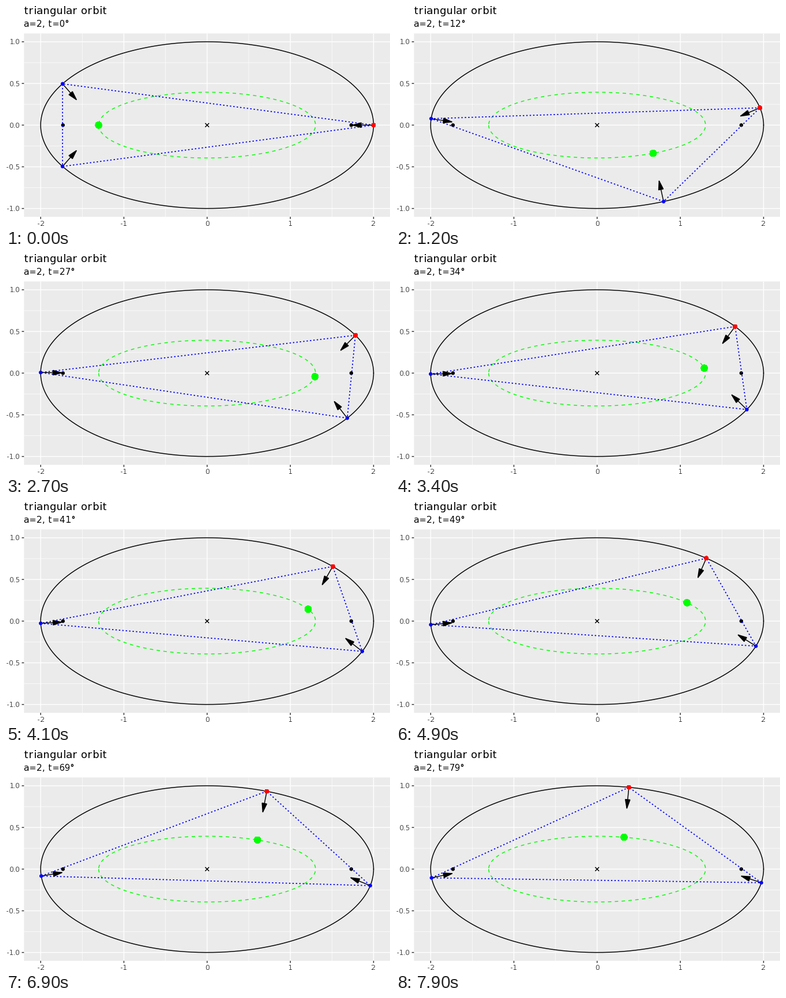
Write a matplotlib script that moves like this. It is 666x381 px and loops after 8 s.

```python
import numpy as np
import matplotlib.pyplot as plt
from matplotlib.animation import FuncAnimation
from matplotlib.patches import Circle, Polygon, Rectangle

W, H, DPI = 666, 381, 100
A, B = 2.0, 1.0
CX, CY, S = 348.8, 206.3, 144.35      # data origin and scale in pixels
PT = 72 / DPI                         # points per pixel
LW = 1.482 * PT

plt.rcParams["font.family"] = "DejaVu Sans"
plt.rcParams["text.hinting_factor"] = 1   # whole-pixel glyph advances
fig = plt.figure(figsize=(W / DPI, H / DPI), dpi=DPI, facecolor="white")
ax = fig.add_axes([0, 0, 1, 1])
ax.set_xlim(0, W)
ax.set_ylim(H, 0)
ax.axis("off")


def px(p):
    """Data coordinates to stage pixels."""
    return np.asarray(p) * [S, -S] + [CX, CY]


def line(pts, color, lw=LW, **kw):
    return ax.plot(*px(pts).T, color=color, lw=lw, snap=False, **kw)[0]


def dot(p, r, color, z=6, **kw):
    return ax.add_patch(Circle(px(p), r, color=color, lw=0, zorder=z, **kw))


def dashes(on, off, lw):
    """Butt-capped dash pattern given in pixels."""
    w = lw / PT
    return dict(ls=(0, (on / w, off / w)), lw=lw, dash_capstyle="butt")


def ellipse(a, b):
    u = np.linspace(0, 2 * np.pi, 721)
    return np.column_stack([a * np.cos(u), b * np.sin(u)])


def label(x, y, s, size, color="black", ha="left"):
    return ax.text(x, y, s, fontsize=size, color=color, ha=ha, va="baseline")


# Three-bounce billiard constants
C2 = A**2 - B**2
DELTA = np.sqrt(A**4 - A**2 * B**2 + B**4)
J = np.sqrt(2 * DELTA - A**2 - B**2) / C2
Q = np.array([1 / A**2, 1 / B**2])


def normal(p):
    g = p * Q
    return -g / np.hypot(*g)


def orbit(t):
    """Vertices of the triangular orbit that starts at parameter t."""
    p = np.array([A * np.cos(t), B * np.sin(t)])
    n = normal(p)
    alpha = np.arccos(J / np.hypot(*(p * Q)))
    pts = [p]
    for s in (-1, 1):
        c, k = np.cos(s * alpha), np.sin(s * alpha)
        d = np.array([c * n[0] - k * n[1], k * n[0] + c * n[1]])
        pts.append(p + d * 2 * J / np.sum(d * d * Q))
    return np.array(pts)


def incenter(v):
    sides = np.hypot(*(np.roll(v, -1, 0) - np.roll(v, 1, 0)).T)
    return sides @ v / sides.sum()


# Panel, grid and axes
XM, YM = 1.1 * A, 1.1 * B
ax.add_patch(Rectangle(px((-XM, YM)), 2 * XM * S + 2, 2 * YM * S,
                       color="#EBEBEB", lw=0, zorder=0, snap=False))
for step, w in ((0.5, LW / 2), (1, LW)):
    for k in range(-4, 5):
        x, y = k * 0.5, k * 0.25
        if (k % 2 == 0) == (step == 1):
            line([(x, -YM), (x, YM)], "white", w, zorder=1, solid_capstyle="butt")
            line([(-XM, y), (XM, y)], "white", w, zorder=1, solid_capstyle="butt")

left, bottom = px((-XM, -YM))
tick = dict(color="#333333", lw=LW, snap=False, solid_capstyle="butt")
for k in range(-2, 3):
    x, y = px((k, k / 2))
    ax.plot([x, x], [bottom, bottom + 3.8], **tick)
    ax.plot([left - 3.8, left], [y, y], **tick)
    label(x, 381, f"{k}", 8.8, "#4D4D4D", "center")
    label(left - 6.9, y + 4.5, f"{k / 2:.1f}", 8.8, "#4D4D4D", "right")

label(31, 14, "triangular orbit", 13.2)
subtitle = label(31, 36.2, "", 11)

# Fixed curves and points; the incenter locus starts at its left end
line(ellipse(A, B), "black", zorder=3)
line(ellipse((B**2 - DELTA) / A, (DELTA - A**2) / B), "#00FF00", zorder=3,
     **dashes(5.928, 5.928, LW))
for f in (-np.sqrt(C2), np.sqrt(C2)):
    dot((f, 0), 3.2, "black", 4)
for s in (-1, 1):
    ax.plot([CX - 2.8, CX + 2.8], [CY - 2.8 * s, CY + 2.8 * s],
            color="black", lw=1.5 * PT, zorder=4)

# Moving parts
triangle = line([(0, 0)], "blue", zorder=4, **dashes(2.4, 3.528, 1.8 * PT))
shafts = [line([(0, 0)], "black", zorder=5) for _ in range(3)]
heads = [ax.add_patch(Polygon(np.zeros((3, 2)), fc="black", ec="black",
                              lw=1.8 * PT, joinstyle="round", zorder=5))
         for _ in range(3)]
corners = [dot((0, 0), 3.5, "red", antialiased=False),
           dot((0, 0), 3.2, "blue"), dot((0, 0), 3.2, "blue")]
center = dot((0, 0), 5.8, "#00FF00", antialiased=False)

HEAD, ANGLE = 15, np.radians(15)


def update(deg):
    v = orbit(np.radians(deg))
    subtitle.set_text(f"a=2, t={deg}°")
    triangle.set_data(*px(v[[0, 1, 2, 0]]).T)
    for p, shaft, head, corner in zip(v, shafts, heads, corners):
        tail, tip = px(p), px(p + 0.25 * normal(p))
        d = (tip - tail) / np.hypot(*(tip - tail))
        side = np.array([-d[1], d[0]]) * HEAD * np.sin(ANGLE)
        base = tip - d * HEAD * np.cos(ANGLE)
        shaft.set_data(*np.array([tail, tip]).T)
        head.set_xy([tip, base + side, base - side])
        corner.center = tail
    center.center = px(incenter(v))
    return [subtitle, triangle, *shafts, *heads, *corners, center]


anim = FuncAnimation(fig, update, frames=80, interval=100, repeat=True,
                     repeat_delay=0, blit=False)
plt.show()
```
